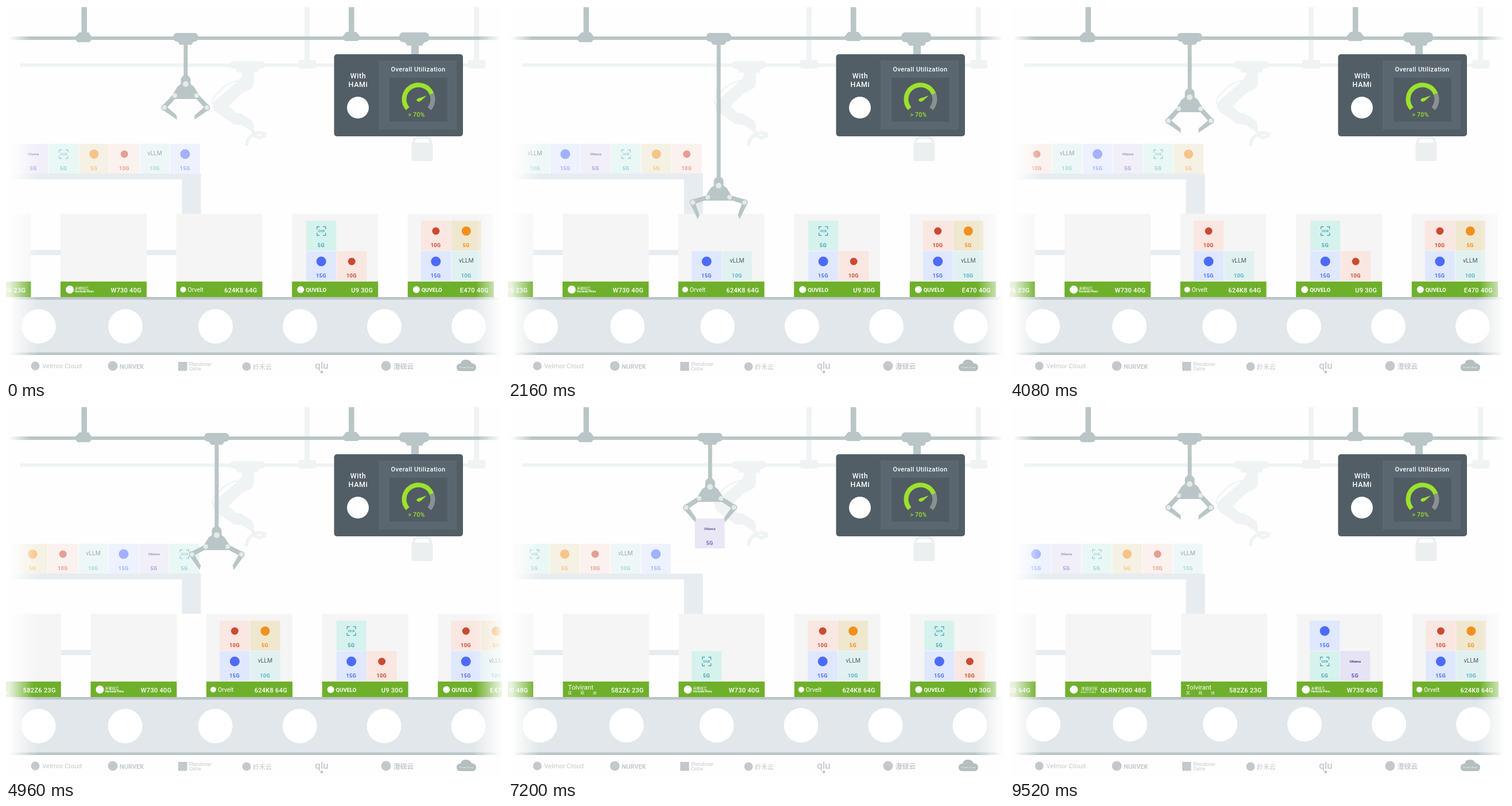
Write an HTML page that moves like this. It is 864 by 648 pixels and loops after 9600 ms.

```html
<!DOCTYPE html>
<html lang="en">
<head>
<meta charset="utf-8">
<title>Utilization line</title>
<style>
html, body { margin: 0; width: 864px; height: 648px; overflow: hidden; background: #fefefe; }
svg { display: block; font-family: Roboto, "Noto Sans CJK SC", "Noto Sans CJK", sans-serif; }
.mid { text-anchor: middle; }
.end { text-anchor: end; }
</style>
</head>
<body>
<svg id="stage" width="864" height="648" viewBox="0 0 864 648">
  <defs>
    <linearGradient id="fadeL"><stop offset="0" stop-color="#fefefe"/><stop offset=".12" stop-color="#fefefe"/><stop offset="1" stop-color="#fefefe" stop-opacity="0"/></linearGradient>
    <linearGradient id="fadeR"><stop offset="0" stop-color="#fefefe" stop-opacity="0"/><stop offset=".95" stop-color="#fefefe"/><stop offset="1" stop-color="#fefefe"/></linearGradient>
  </defs>

  <!-- back rail and resting arm -->
  <g fill="#f0f3f4">
    <path d="M25 100H835V106H25ZM520 2h9v92h-9ZM815 2h9v92h-9Z"/>
    <rect x="509" y="94" width="31" height="15" rx="4"/>
    <rect x="805" y="94" width="30" height="15" rx="4"/>
    <rect x="390" y="96" width="61" height="13" rx="6"/>
    <path d="M398 105H443L438 116H432V134Q431 143 423 146L411 152 388 174 400 186 409 187 430 201 432 212 423 216 411 207 396 206 365 184Q357 175 363 166L405 130Q411 124 411 116H403Z"/>
    <path d="M409 130Q386 131 371 150Q357 161 360 171" fill="none" stroke="#f0f3f4" stroke-width="2.5"/>
    <path d="M425 209L432 222M453 224Q437 217 430 225Q419 230 419 244M432 225L441 230 452 225" fill="none" stroke="#f0f3f4" stroke-width="6"/>
  </g>

  <!-- front rail -->
  <g fill="#b9c5c6">
    <path d="M6 53H862V59H6ZM131.500 2h9.500v46h-9.500ZM597 2h9.500v46H597Z"/>
    <path d="M128 46h16l5 7v6l-4 4h-20l-4-4v-6ZM593 45h17l6 7v6l-4 3h-21l-4-3v-6Z"/>
    <rect x="685" y="46" width="52" height="17" rx="7"/>
    <path d="M693 60h37l-5 9h-6v16h-13V69h-7Z"/>
  </g>
  <rect y="50" width="42" height="12" fill="url(#fadeL)"/>
  <rect x="822" y="50" width="42" height="12" fill="url(#fadeR)"/>

  <!-- feeder and pipe -->
  <path d="M0 292H339.500V362H306.500V302H0ZM0 425H297V434H0Z" fill="#e7ecf0"/>

  <!-- belt -->
  <rect y="509" width="864" height="97" fill="#e1e7ea"/>
  <path d="M0 507H864V511.500H0ZM0 603.500H864V608H0Z" fill="#b9c4c7"/>
  <g id="wheels" fill="#fff"></g>
  <g id="boards"></g>
  <g id="items"></g>

  <rect y="238" width="56" height="242" fill="url(#fadeL)"/>
  <rect y="480" width="48" height="27" fill="url(#fadeL)" opacity=".85"/>
  <rect y="507" width="56" height="102" fill="url(#fadeL)"/>
  <rect x="818" y="360" width="54" height="147" fill="url(#fadeR)"/>
  <rect x="812" y="507" width="52" height="102" fill="url(#fadeR)"/>

  <!-- claw -->
  <g id="cart" fill="#b9c5c6">
    <rect x="-21.500" y="47" width="43" height="15" rx="6"/>
    <path d="M-15 60h30l-5 7.500h-20Z"/>
    <rect id="rod" x="-3.500" y="62" width="7" height="1"/>
    <g id="claw">
      <g id="armL"></g><g id="armR"></g>
      <path d="M-8.500 0V-8Q-8.500-11-5-14Q0-17 5-14Q8.500-11 8.500-8V0L14 4 25 22V26H-25V22L-14 4Z"/>
      <g fill="#e4eaea"><circle r="5"/><circle cx="-19" cy="20" r="4"/><circle cx="19" cy="20" r="4"/></g>
    </g>
  </g>

  <!-- lock and monitor -->
  <path d="M710 242V238Q710 229 719 229H731Q740 229 740 238V242" fill="none" stroke="#eceff0" stroke-width="4"/>
  <rect x="706.500" y="238" width="37" height="32" rx="2" fill="#eceff0"/>
  <rect x="571.500" y="84" width="224.500" height="143" rx="5" fill="#525e66"/>
  <rect x="649" y="95" width="136" height="120" fill="#5b6770"/>
  <rect x="668" y="125" width="100.500" height="76.500" fill="#515b63"/>
  <g class="mid" fill="#fff" font-weight="500" letter-spacing=".6">
    <text x="613.500" y="125.500" font-size="12.500">With</text>
    <text x="613.500" y="140.500" font-size="12.500">HAMi</text>
    <text x="718" y="113.500" font-size="11" letter-spacing=".45">Overall Utilization</text>
    <text x="715" y="193" font-size="10.500" letter-spacing=".3" fill="#9be22d">&gt; 70%</text>
  </g>
  <circle cx="613" cy="177" r="19" fill="#fff"/>
  <g id="gauge" fill="none" stroke-width="8"></g>
  <path d="M715 164Q717 160 721 160L733 156 723 165Q718 169 715 164Z" fill="#9be22d"/>

  <!-- providers -->
  <g fill="#c3c9cb">
    <circle cx="51" cy="627" r="7.500"/>
    <text x="63" y="631" font-size="11.500">Velmor Cloud</text>
    <circle cx="186" cy="627" r="8.500"/>
    <text x="198" y="631.500" font-size="11" font-weight="700">NURVEK</text>
    <rect x="300" y="620" width="15.500" height="15.500"/>
    <text x="319" y="626.500" font-size="8.800">Plendovar</text>
    <text x="319" y="635" font-size="8.800">Ostre</text>
    <circle cx="419" cy="628" r="7.500"/>
    <text x="430" y="632.500" font-size="11">岭禾云</text>
    <text class="mid" x="550" y="632" font-size="17" font-weight="500">qlu</text>
    <circle cx="550" cy="637.500" r="2.500"/>
    <circle cx="662" cy="627" r="8.500"/>
    <text x="675" y="631.500" font-size="11.800" font-weight="700">澄砚云</text>
    <path d="M791 636Q784 635 785 628Q786 623 792 623Q794 615 802 616Q808 616 811 622Q819 623 819 630Q818 636 812 636Z" fill="#b5bec0"/>
    <text class="mid" x="802" y="631" font-size="4.200" fill="#f0f3f4">Private Cloud</text>
  </g>
</svg>

<script>
const LOOP = 9600, STEP = 80, PITCH = 201.6, SHIFT = 202.2;
const starts = [0, 1360, 2720, 4000, 5360, 6800, 8320];
const GRAB = 160, DROP = 720;

// ms, x, y, arm angle
const keys = [
  [0, 313, 136, 0], [80, 313, 159, 0], [160, 313, 185, 20], [240, 313, 185, 14.5],
  [320, 318, 141, 14.5], [400, 352, 141, 14.5], [480, 367, 144, 14.5], [560, 367, 173, 14.5],
  [640, 367, 240, 14.5], [720, 367, 313, 14.5], [800, 367, 313, 30], [880, 367, 300, 30],
  [1040, 367, 150, 10], [1120, 358, 136, 0], [1200, 313, 136, 0]
];

const kinds = {
  seek: { bg: "#dfe8ff", ink: "#4d6bfe", size: "15G", dot: 8.5 },
  vllm: { bg: "#e1f1f1", ink: "#55b3c6", size: "10G", word: ["vLLM", 10.5, 20, "#555d60", 400] },
  torch: { bg: "#fae7e1", ink: "#cb4a32", size: "10G", dot: 6.5 },
  flow: { bg: "#f0e7cf", ink: "#f2901d", size: "5G", dot: 8 },
  ocr: { bg: "#d6f2ed", ink: "#48a5b8", size: "5G", scan: true },
  ollama: { bg: "#e6e3f4", ink: "#5d4fc0", size: "5G", word: ["Ollama", 6.2, 20, "#453d78", 700] }
};
const order = ["seek", "vllm", "torch", "flow", "ocr", "ollama"];
const slots = [[23, 427], [76, 427], [23, 374], [76, 374]];

const boards = [
  { chip: "E470 40G", mark: [15, 6], names: [["QUVELO", 24, 497.5, 9.5, 700]], load: { torch: 2, flow: 3, seek: 0, vllm: 1 } },
  { chip: "U9 30G", mark: [15, 6], names: [["QUVELO", 24, 497.5, 9.5, 700]], load: { ocr: 2, seek: 0, torch: 1 }, inset: 2 },
  { chip: "624K8 64G", mark: [12, 5], names: [["Orvelt", 20, 497.5, 10.5, 400]] },
  { chip: "W730 40G", mark: [16, 7], names: [["禾曜砚芯", 25, 493.5, 6, 500], ["Harvendo Plimx", 25, 499, 4.6, 700]] },
  { chip: "582Z6 23G", names: [["Tolvirant", 9, 494, 11.5, 400], ["岚", 9, 502, 6.5, 400], ["砾", 31, 502, 6.5, 400], ["洲", 52, 502, 6.5, 400]] },
  { chip: "QLRN7500 48G", mark: [15, 7], names: [["沐垣织序", 27, 494.5, 7.4, 500], ["BRAVEL QUINDS", 27, 500, 3.6, 400]] },
  { chip: "F300 64G" }
];

const $ = id => document.getElementById(id);
const lerp = (a, b, k) => a + (b - a) * k;
const clamp = v => Math.max(0, Math.min(1, v));
const ease = v => { v = clamp(v); return v * v * (3 - 2 * v); };
const text = (s, x, y, size, weight, fill, cls = "") =>
  `<text class="${cls}" x="${x}" y="${y}" font-size="${size}" font-weight="${weight}" fill="${fill}">${s}</text>`;

function tile(name) {
  const k = kinds[name];
  let icon = "";
  if (k.dot) icon = `<circle cx="26" cy="18" r="${k.dot}" fill="${k.ink}"/>`;
  if (k.word) icon = text(k.word[0], 26, k.word[2], k.word[1], k.word[4], k.word[3], "mid");
  if (k.scan) icon = `<path d="M18.500 15V10.500H23M29 10.500H33.500V15M33.500 21V25.500H29M23 25.500H18.500V21" fill="none" stroke="${k.ink}" stroke-width="1.300"/>` +
    text("OCR", 26, 20.2, 6, 700, k.ink, "mid");
  return `<rect width="52" height="52" fill="${k.bg}"/>${icon}` +
    `<g letter-spacing=".3">${text(k.size, 25.7, 45.5, 9.2, 700, k.ink, "mid")}</g>`;
}

function board(b) {
  const load = Object.entries(b.load || {}).map(([name, n]) =>
    `<g transform="translate(${slots[n][0] + (b.inset || 0)} ${slots[n][1]})">${tile(name)}</g>`).join("");
  const mark = b.mark ? `<circle cx="${b.mark[0]}" cy="494" r="${b.mark[1]}" fill="#fff"/>` : "";
  const names = (b.names || []).map(([s, x, y, size, w]) => text(s, x, y, size, w, "#fff")).join("");
  return `<g><rect y="362" width="150" height="118" fill="#f4f5f4"/>` +
    `<rect y="480" width="150" height="27" fill="#6fb02b"/>${mark}${names}` +
    `<g letter-spacing=".3">${text(b.chip, 141, 498.5, 11, 500, "#fff", "end")}</g>${load}</g>`;
}

function arc(from, to, color) {
  const p = a => `${718.5 + 25 * Math.cos(a * Math.PI / 180)} ${162.5 + 25 * Math.sin(a * Math.PI / 180)}`;
  return `<path d="M${p(from)}A25 25 0 ${to - from > 180 ? 1 : 0} 1 ${p(to)}" stroke="${color}"/>`;
}

$("boards").innerHTML = boards.map(board).join("");
$("items").innerHTML = Array.from({ length: 14 }, (_, i) => `<g>${tile(order[i % 6])}</g>`).join("");
$("wheels").innerHTML = [57, 208, 365, 512, 659, 806].map(x => `<circle cx="${x}" cy="558" r="30"/>`).join("");
$("gauge").innerHTML = arc(139, 338, "#9be22d") + arc(338, 401, "#8b9093");
const arm = `<path d="M-3 -2L-22 18 -20 24 -16 24 3 3ZM-22 18L-17 17 3 34 4 42 -21 25Z"/><circle cx="-18" cy="21" r="5.500"/><circle cx="-18" cy="21" r="4" fill="#e4eaea"/>`;
$("armL").innerHTML = $("armR").innerHTML = arm;

const boardEls = [...$("boards").children], itemEls = [...$("items").children];
const move = (el, x, y) => el.setAttribute("transform", `translate(${x} ${y})`);

function pose(c) {
  const i = keys.findIndex(k => k[0] > c);
  if (i < 0) return keys[keys.length - 1].slice(1);
  const a = keys[i - 1], b = keys[i], k = (c - a[0]) / (b[0] - a[0]);
  return [1, 2, 3].map(n => lerp(a[n], b[n], k));
}

const slide = (t, i) => ease((t - starts[i] - 880) / 240);

function itemAt(i, t, fed, belt) {
  const c = i < starts.length ? t - starts[i] : -1;
  if (c < GRAB) return [286 - (i - fed) * 52.9 - fed * 0.3, 240, 0.52];
  const [x, y] = pose(Math.min(c, DROP));
  const held = [x - 26.5, y + 55];
  if (c < DROP) return [...held, lerp(0.52, 1, clamp((c - GRAB) / 340))];
  const home = i < 4 ? 0 : 1, [sx, sy] = slots[home ? i - 4 : i];
  const k = clamp((c - DROP) / 80);
  return [lerp(held[0], 297 + sx, k) + (belt - home) * SHIFT, lerp(held[1], sy, k), 1];
}

function draw(t) {
  const belt = slide(t, 3) + slide(t, 6);
  const fed = starts.reduce((n, s) => n + ease((t - s - 560) / 220), 0);
  const cycle = starts.filter(s => s <= t).length - 1;
  const [x, y, grip] = pose(t - starts[cycle]);

  boardEls.forEach((el, i) => move(el, 700 - PITCH * i - 0.2 + SHIFT * belt, 0));
  itemEls.forEach((el, i) => {
    const [ix, iy, alpha] = itemAt(i, t, fed, belt);
    move(el, ix, iy);
    el.setAttribute("opacity", alpha);
  });
  move($("wheels"), belt < 1 ? -1.5 * belt : 2.5 * belt - 4, -1.8 * belt);

  move($("cart"), x, 0);
  move($("claw"), 0, y);
  $("rod").setAttribute("height", y - 72);
  $("armL").setAttribute("transform", `translate(-19 20) rotate(${grip})`);
  $("armR").setAttribute("transform", `translate(19 20) scale(-1 1) rotate(${grip})`);
}

function tick() {
  const t = performance.now() % LOOP;
  draw(Math.floor(t / STEP) * STEP);
  requestAnimationFrame(tick);
}
tick();
</script>
</body>
</html>
```
